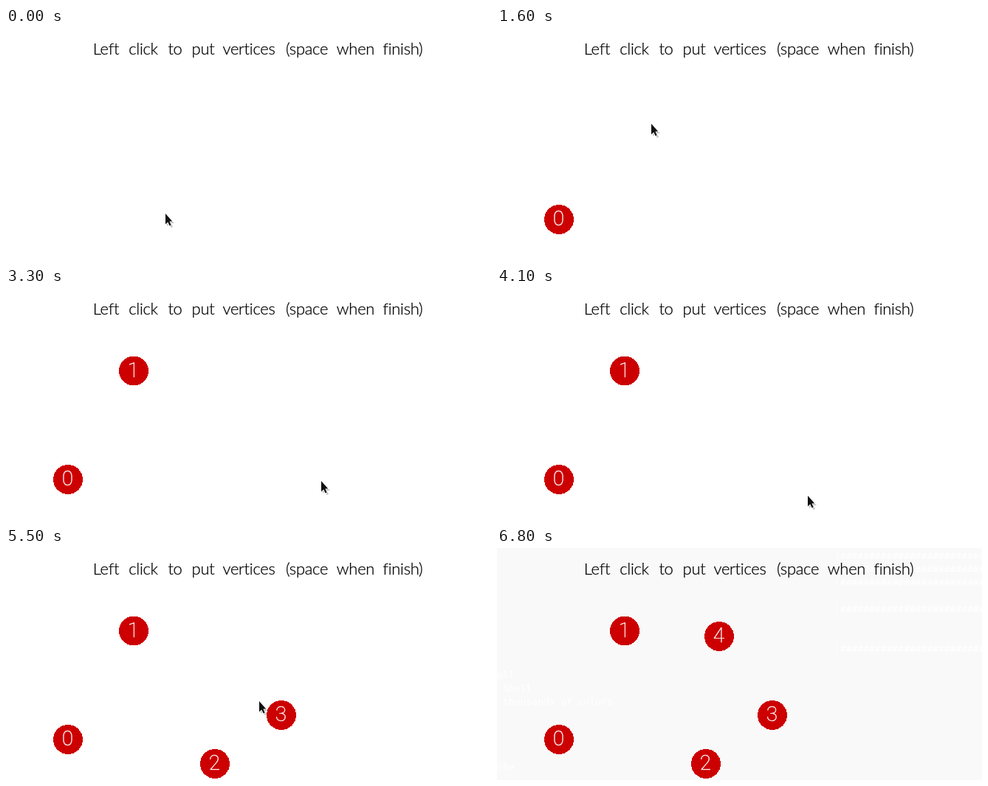
Write an HTML page that moves like this. It is 657 px wide and 315 px high and loops after 7500 ms.

```html
<!DOCTYPE html>
<html lang="en">
<head>
<meta charset="utf-8">
<style>
  html, body { margin: 0; width: 100%; height: 100%; overflow: hidden; background: #fff; }
  svg { display: block; width: 657px; height: 315px; }
  text { text-anchor: middle; }
  .title text { font: 300 22px Lato, sans-serif; letter-spacing: -.3px; stroke: #000; stroke-width: .25; }
  .vertex circle { fill: #c00; shape-rendering: crispEdges; }
  .vertex text { font: 100 28px Roboto, sans-serif; fill: #fff; stroke: #fff; stroke-width: .45; }
  .ghost text { font: 13px "DejaVu Sans Mono", monospace; fill: #fff; text-anchor: start; }
</style>
</head>
<body>
<svg viewBox="0 0 657 315">
  <g id="ghost" class="ghost"><rect width="657" height="315" fill="#f9f9f9"/></g>
  <g class="title">
    <text x="135.5" y="36">Left</text> <text x="186" y="36">click</text>
    <text x="229" y="36">to</text> <text x="267" y="36">put</text>
    <text x="329" y="36">vertices</text> <text x="407.5" y="36">(space</text>
    <text x="473.5" y="36">when</text> <text x="537.5" y="36">finish)</text>
  </g>
  <g id="vertices"></g>
  <g id="cursor">
    <path d="M2 4V18L5 15L7.5 20L10 19L8 14H12Z" fill="#000" opacity=".25"/>
    <path d="M0 1V15.5L3.3 12.4L5.6 17.6L7.7 16.7L5.5 11.4H9.3Z" fill="#111" stroke="#fff" stroke-width="1.6" paint-order="stroke"/>
  </g>
</svg>
<script>
const LOOP = 7500, STEP = 100, FADE = 68;
const $ = id => document.getElementById(id);

function add(parent, tag, attrs, text = '') {
  const el = document.createElementNS('http://www.w3.org/2000/svg', tag);
  for (const key in attrs) el.setAttribute(key, attrs[key]);
  el.textContent = text;
  return parent.appendChild(el);
}

// Each vertex: centre and the step at which it is placed
const spots = [[84, 260], [173, 112.5], [283, 293], [373, 227], [301, 120]];
const placed = [8, 20, 49, 54, 65];
const vertices = spots.map(([cx, cy], i) => {
  const el = add($('vertices'), 'g', { class: 'vertex' });
  add(el, 'circle', { cx, cy, r: 20 });
  add(el, 'text', { x: cx - .5, y: cy + 8 }, i);
  return el;
});

// Pointer moves: first step, last step, then Bezier points that continue from the previous end
const home = [216, 251];
const moves = [
  [0, 4, spots[0]],
  [10, 18, [284, 133], spots[1]],
  [21, 29, [338, 252], [459, 224]],
  [29, 37, [440, 273], [370, 273]],
  [39, 45, [634, 273], [88, 305], [265, 297]],
  [46, 48, [283, 291]],
  [49, 53, spots[3]],
  [54, 59, [292, 177], [273, 127]],
  [61, 63, spots[4]],
  [66, 67, [55, 26]]
];

// De Casteljau: blend neighbours until one point is left
function bezier(points, u) {
  while (points.length > 1)
    points = points.slice(1).map((b, i) => b.map((v, n) => points[i][n] * (1 - u) + v * u));
  return points[0];
}

function tipAt(step) {
  let tip = home;
  for (const [from, to, ...points] of moves) {
    if (step <= from) break;
    tip = bezier([tip, ...points], Math.min(1, (step - from) / (to - from)));
  }
  return tip.map(Math.round);
}

// Pale terminal behind the last picture
const ghostText = (x, y, text) => add($('ghost'), 'text', { x, y }, text);
ghostText(0, 177, 'ell');
ghostText(8, 195, 'Shell');
ghostText(8, 213, 'thousands of colors');
ghostText(0, 302, 'che');
for (const row of [0, 1, 2, 4, 7]) ghostText(457, 15 + row * 18, '[' + '#'.repeat(26));

const show = (el, on) => el.style.display = on ? '' : 'none';

function draw(now) {
  const step = Math.floor(now % LOOP / STEP);
  vertices.forEach((el, i) => show(el, step >= placed[i]));
  show($('ghost'), step >= FADE);
  show($('cursor'), step < FADE);
  $('cursor').setAttribute('transform', `translate(${tipAt(step)})`);
}

const start = performance.now();
function frame() {
  draw(performance.now() - start);
  requestAnimationFrame(frame);
}
frame();
</script>
</body>
</html>
```
